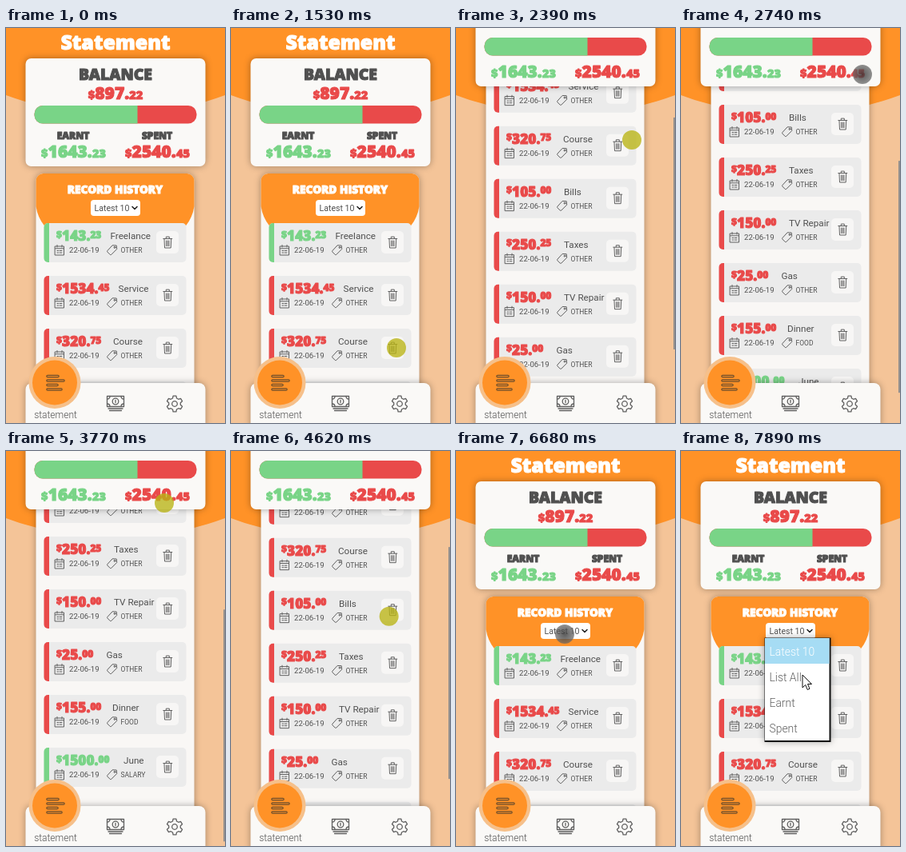
An HTML page for the animation above (8000 ms loop, 274 px wide and 494 px high).

```html
<!DOCTYPE html>
<html lang="en">
<head>
<meta charset="utf-8">
<title>Statement</title>
<style>
html, body { margin: 0; width: 100%; height: 100%; overflow: hidden; background: #f4c498; }
svg { display: block; width: 100vw; height: 100vh; font-family: Roboto, sans-serif; fill: #505050; }
.big { font-family: "Open Sans", sans-serif; font-weight: 800; stroke-width: 1.1px; stroke-linejoin: round; }
.mid { text-anchor: middle; }
.dark { fill: #505050; stroke: #505050; }
.white { fill: #fff; stroke: #fff; }
.earn { fill: #79d487; stroke: #79d487; }
.spend { fill: #e94a4a; stroke: #e94a4a; }
.flat { stroke: none; }
.line { fill: none; stroke: #606060; stroke-linecap: round; stroke-linejoin: round; }
.shade { filter: drop-shadow(0 0 4px #0005); }
</style>
</head>
<body>
<svg id="stage" viewBox="0 0 274 494"></svg>
<script>
const STEP = 172, START = 990, LOOP = 8000;
const stage = document.getElementById("stage");
const $ = id => document.getElementById(id);

const heavy = (x, y, size, tone, text) =>
  `<text class="big mid ${tone}" x="${x}" y="${y}" font-size="${size}">${text}</text>`;

// Dollar sign and cents are smaller; lift raises them above the baseline.
function money(x, y, size, tone, value, lift = 0, align = "") {
  const [whole, cents] = value.split(".");
  return `<text class="big ${align} ${tone}" x="${x}" y="${y - lift}" font-size="${size * .69}">$<tspan
    dy="${lift}" font-size="${size}">${whole}.</tspan><tspan dy="${-lift}">${cents}</tspan></text>`;
}

const rows = [
  ["143.23", "Freelance", 130.5, "OTHER", "earn"],
  ["1534.45", "Service", 140.5, "OTHER"],
  ["320.75", "Course", 134, "OTHER"],
  ["105.00", "Bills", 135, "OTHER"],
  ["250.25", "Taxes", 135, "OTHER"],
  ["150.00", "TV Repair", 135, "OTHER"],
  ["25.00", "Gas", 125.5, "OTHER"],
  ["155.00", "Dinner", 133, "FOOD"],
  ["1500.00", "June", 147, "SALARY", "earn"]
];

const row = ([value, name, x, kind, tone = "spend"], i) => `
  <g transform="translate(0 ${244 + 66 * i})">
    <rect x="47.5" width="178" height="49" rx="5" fill="#ebebeb"/>
    <path class="flat ${tone}" d="M54 0v49h-1.5a5 5 0 0 1-5-5v-39a5 5 0 0 1 5-5z"/>
    ${money(63, 22, 17.3, tone, value, 3.5)}
    <text x="${x}" y="20" font-size="11.7">${name}</text>
    <use href="#date" x="61" y="27"/><text x="79" y="37" font-size="9.6">22-06-19</text>
    <use href="#tag" x="126" y="27"/>
    <text x="143.5" y="37" font-size="8.5">${kind}</text>
    <rect x="188" y="10" width="28" height="28" rx="5" fill="#f7f6f5"/>
    <use href="#bin" x="196" y="16"/>
  </g>`;

// Six-toothed gear outline around the origin.
const gear = Array.from({length: 24}, (_, i) => {
  const r = i % 4 < 2 ? 10 : 7.4;
  const a = (Math.floor(i / 4) * 60 + [-11, 11, 20, 40][i % 4] - 90) * Math.PI / 180;
  return [r * Math.cos(a), r * Math.sin(a)].map(v => v.toFixed(1));
}).join(" ");

const option = (text, i) =>
  `<text x="110.5" y="${256 + 32 * i}" fill="${i ? "#606060" : "#fff"}">${text}</text>`;

stage.innerHTML = `
<defs>
  <g id="date" class="line">
    <path d="M.5 2h11v11h-11zM.5 4.8h11M3 .5v2.500M9 .5v2.500M3 7.500h1.500M6 7.500h3M3 10h1.500M6 10h3"/>
  </g>
  <g id="tag" class="line">
    <path d="M7.500 .8l4.700.2.5 4.500-7 7q-.7.6-1.400 0l-3.500-3.500q-.5-.7 0-1.300z"/><circle cx="10" cy="3.400" r="1"/>
  </g>
  <g id="bin" class="line">
    <path d="M.8 3.500h11M4.300 3.300v-2.200h4v2.200M2 3.800l.5 11.200h7.700l.5-11.200M4.600 6v6.700M6.300 6v6.700M8 6v6.700"/>
  </g>
  <path id="lines" d="M52 435.500h13M52 441h20M52 446.500h12M52 452h17"/>
  <radialGradient id="idle">
    <stop offset="0" stop-color="#333" stop-opacity=".8"/><stop offset="1" stop-color="#666" stop-opacity=".72"/>
  </radialGradient>
</defs>
<rect width="274" height="494" fill="#f4c498"/>
<circle cx="137" cy="-286.5" r="395" fill="#ff9227"/>

<g id="page">
  ${heavy(137, 27, 25, "white", "Statement")}
  <rect class="shade" x="37.5" y="182" width="198" height="760" rx="9" fill="#f9f7f5"/>
  <path fill="#ff9227" d="M37.5 191a9 9 0 0 1 9-9h180a9 9 0 0 1 9 9v32q-2 14-11 25h-176q-9-11-11-25z"/>
  ${heavy(136.5, 207, 13.7, "white", "RECORD HISTORY")}
  <rect x="106" y="215" width="62" height="20" rx="4" fill="#fff"/>
  <text x="110.5" y="229" font-size="10.6">Latest 10</text>
  <path class="line" d="M158 223.5l3 3 3-3" style="stroke:#222" stroke-width="1.6"/>
  ${rows.map(row).join("")}
</g>

<g id="card">
  <rect class="shade" x="24.5" y="38" width="225" height="135" rx="7" fill="#faf9f7"/>
  <g id="heads">
    ${heavy(137, 65, 19.5, "dark", "BALANCE")}
    ${money(137, 89, 21, "spend", "897.22", 0, "mid")}
    ${heavy(84, 139, 12, "dark", "EARNT")}${heavy(189, 139, 12, "dark", "SPENT")}
  </g>
  <g id="ratio">
    <rect class="flat spend" x="35.5" y="97" width="203" height="22.5" rx="10.5"/>
    <path class="flat earn" d="M164.5 97v22.5H46a10.5 10.5 0 0 1-10.5-10.5v-1.5a10.5 10.5 0 0 1 10.5-10.5z"/>
  </g>
  ${money(84.5, 162, 21, "earn", "1643.23", 0, "mid")}
  ${money(189.5, 162, 21, "spend", "2540.45", 0, "mid")}
</g>

<rect class="shade" x="24.5" y="444" width="225" height="60" rx="8" fill="#faf9f7"/>
<circle cx="61" cy="443.5" r="32.5" fill="#f6c08a"/>
<circle cx="61" cy="443.5" r="28" fill="#ff9227"/>
<use href="#lines" class="line" style="stroke:#6b4d2c" stroke-width="3.6"/>
<use href="#lines" class="line" style="stroke:#ff9227" stroke-width="1.2"/>
<text class="mid" x="62" y="488" font-size="12" font-weight="300">statement</text>
<g class="line" stroke-width="1.3">
  <path d="M126.5 460.5h21v13h-21zM128 476h18M129.5 478.5h15"/>
  <circle cx="137" cy="467" r="3.8"/>
  <path d="M137 465.5v3M126.5 464q3.5 0 3.5-3.5M144 460.5q0 3.5 3.5 3.5M126.5 470q3.5 0 3.5 3.5M144 473.5q0-3.5 3.5-3.5"/>
  <g transform="translate(211 470)"><polygon points="${gear}"/><circle r="3.3"/></g>
</g>

<rect id="bar" x="272" width="2" fill="#96918e"/>
<g id="menu" class="shade" font-size="13.9" font-weight="300">
  <rect x="104.5" y="233.5" width="83" height="130.5" fill="#111"/>
  <rect x="105" y="234" width="80.5" height="128" fill="#fff"/>
  <rect x="105" y="234" width="80.5" height="32" fill="#a6dcf4"/>
  ${["Latest 10", "List All", "Earnt", "Spent"].map(option).join("")}
</g>
<circle id="touch" r="12"/>
<path id="arrow" d="M0 0v16l3.7-3.5 2.5 6 2.8-1.2-2.5-5.8h5z" fill="#fff" stroke="#111"/>`;

// Keys are [step, value, ...], joined by straight lines.
const touchKeys = [
  [0, 262, 476], [3, 207, 400], [6, 209, 293], [8, 220, 140], [10, 227, 58], [13, 205, 125],
  [16, 198, 65], [18, 196, 24], [20, 197, 60], [23, 199, 500],
  [30, 229, 225], [31, 185, 212], [32, 125, 224], [33, 136, 229]
];
const scrollKeys = [[3, 0], [6, 100], [9, 330], [10, 346], [14, 346], [16, 401], [20, 401], [23, 0]];
const arrowKeys = [[37, 166, 250], [38, 160, 265], [40, 152, 280]];

function sample(keys, n) {
  if (n <= keys[0][0]) return keys[0].slice(1);
  const j = keys.findIndex(k => k[0] > n);
  if (j < 0) return keys[keys.length - 1].slice(1);
  const a = keys[j - 1], b = keys[j], u = (n - a[0]) / (b[0] - a[0]);
  return a.slice(1).map((v, i) => v + (b[i + 1] - v) * u);
}

const within = (n, ...spans) => spans.some(([a, b]) => n >= a && n <= b);
const move = (id, x, y) => $(id).setAttribute("transform", `translate(${x} ${y})`);
const fade = (id, value) => $(id).setAttribute("opacity", Math.max(0, Math.min(1, value)));

function draw(now) {
  const n = Math.floor((now % LOOP - START) / STEP);
  const [scroll] = sample(scrollKeys, n);
  const stuck = Math.min(scroll, 100);

  // The card sticks after 100px and folds its headings away.
  move("page", 0, -scroll);
  move("card", 0, -stuck);
  move("ratio", 0, Math.max(0, stuck - 85));
  fade("heads", (90 - stuck) / 30);

  // Folding shortens the page, so the thumb grows and lags behind.
  move("bar", 0, Math.max(0, (scroll - 62) * .585));
  $("bar").setAttribute("height", 270 + stuck * .2);
  fade("bar", n < 4 ? 0 : (27 - n) / 4);

  move("touch", ...sample(touchKeys, n));
  fade("touch", within(n, [0, 23], [30, 36]) ? 1 : 0);
  $("touch").setAttribute("fill", within(n, [3, 9], [14, 17], [20, 23]) ? "#b9b414c8" : "url(#idle)");

  fade("menu", n >= 35 ? 1 : 0);
  move("arrow", ...sample(arrowKeys, n));
  fade("arrow", n >= 37 ? 1 : 0);
  requestAnimationFrame(() => draw(performance.now()));
}
draw(0);
</script>
</body>
</html>
```
